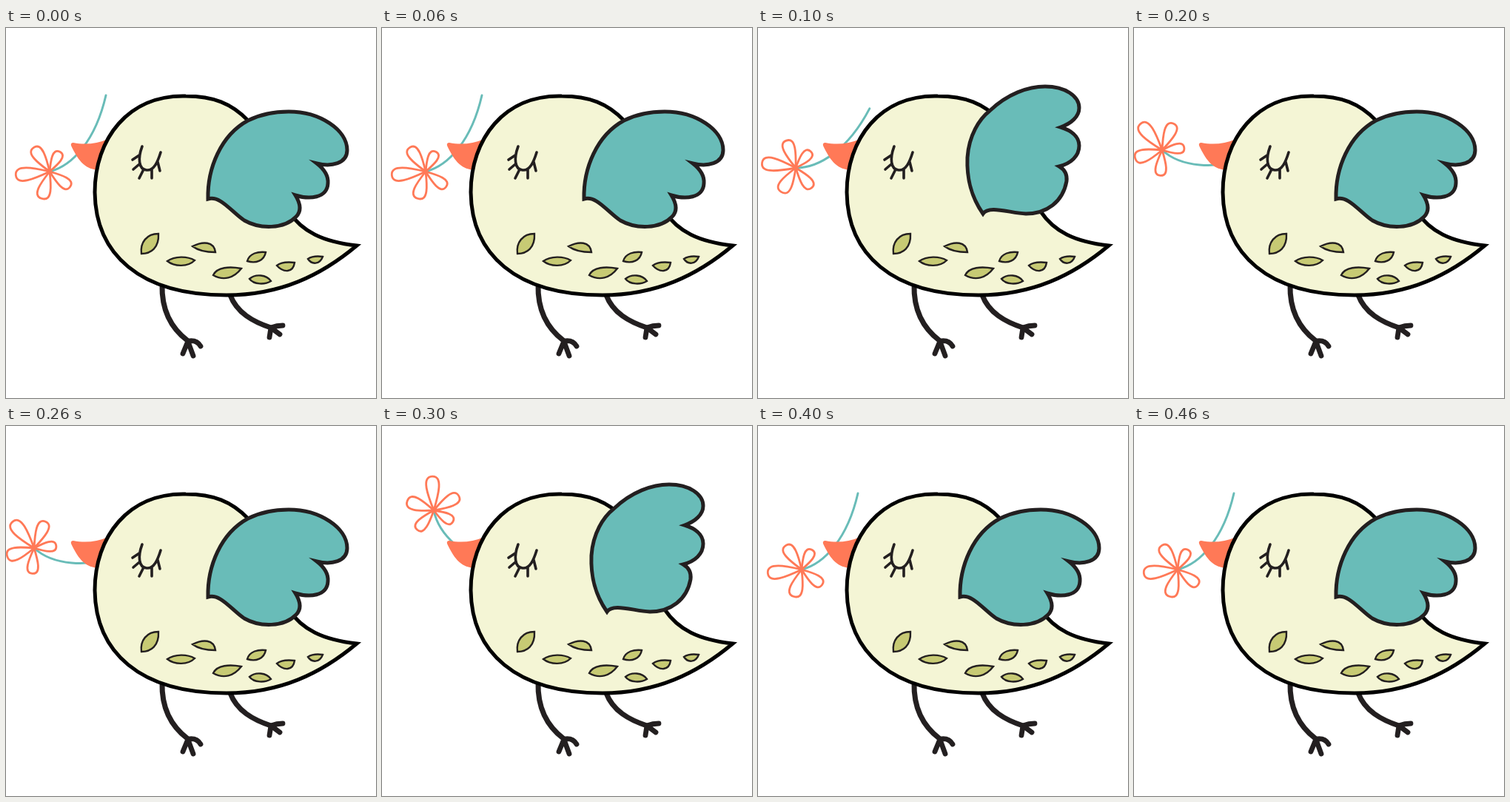
Write an HTML page with a canvas that moves like this. It is 500 px wide and 500 px high and loops after 0.5 s.

```html
<!DOCTYPE html>
<html lang="en">
<head>
<meta charset="utf-8">
<title>Bird with a flower</title>
<style>
  html, body { margin: 0; width: 100%; height: 100%; overflow: hidden; background: #fff; }
  canvas { display: block; }
</style>
</head>
<body>
<canvas id="stage" width="500" height="500"></canvas>
<script>
const ctx = document.getElementById('stage').getContext('2d');
const INK = '#231f20', CREAM = '#f4f5d5', TEAL = '#69bcb8', CORAL = '#ff7957', OLIVE = '#c7ca74';
const STEP = 100;

const body = new Path2D('M474 294C428 289 400 275 382 248C360 215 355 155 327 125C305 102 280 92 243 92C165 90 120 150 120 222C121 305 180 361 298 361C370 361 425 335 474 294Z');
const beak = new Path2D('M91 155C106 158 122 157 138 150L126 192C108 191 99 182 88 159Q87 155 91 155Z');
const stem = new Path2D('M0 0C31 -8 62 -42 76 -103');

const wings = [
  'M273 231C272 190 290 145 327 125C343 117 362 113 382 113C425 113 461 138 461 165C461 183 440 188 420 183C429 190 436 199 435 210C434 230 410 232 391 226C396 234 401 246 392 255C376 272 343 272 322 260C305 249 290 226 273 231Z',
  'M304 251C286 225 282 200 283 175C285 145 299 123 313 112C337 89 365 79 388 79C415 79 434 92 434 108C434 120 423 129 409 134C422 138 434 146 434 159C434 173 423 183 407 187C414 191 418 198 417 207C412 235 390 251 362 251C340 250 312 239 304 251Z'
].map(d => new Path2D(d));

const leaves = new Path2D([
  'M206 278C190 278 181 290 183 305C196 305 207 297 206 278Z',
  'M218 315C228 308 245 308 255 314C246 323 228 323 218 315Z',
  'M252 295C266 288 281 288 283 303C271 303 260 301 252 295Z',
  'M280 334C285 323 302 322 318 325C308 338 294 342 280 334Z',
  'M326 315C329 304 341 302 351 303C349 314 338 319 326 315Z',
  'M329 339C337 332 352 333 358 342C350 347 335 347 329 339Z',
  'M366 321C372 316 381 316 390 317C388 331 375 331 366 321Z',
  'M408 312C414 308 421 308 428 309C424 320 413 320 408 312Z'
].join(''));

const eye = new Path2D('M184 160C178 176 179 191 190 192C200 193 205 181 209 168M180 172L171 178M179 185L172 191M185 193L180 203M197 191V203M205 181L208 193');
const legs = new Path2D('M211 347C210 385 226 408 246 423M303 361C312 385 334 397 358 405');
const toes = new Path2D('M246 423L239 440M246 424L253 443M246 423Q258 421 263 430M358 405Q366 402 374 402M358 405L370 414M358 405L356 418');

// angle in degrees, length, half width
const petals = [[-123.7, 39, 9.2], [-62.6, 30, 7.8], [173.8, 46, 10.2], [106, 38, 10], [37, 34.5, 8.5]];
// flower centre and turn for each pose
const poses = [[59, 194, 0], [51, 189, 14.8], [38, 165, 57], [70, 114, 93.5], [59, 194, 0]];

const rad = deg => deg * Math.PI / 180;

function line(path, color, width, join = 'miter') {
  ctx.strokeStyle = color;
  ctx.lineWidth = width;
  ctx.lineJoin = join;
  ctx.stroke(path);
}

function shape(path, fill, color, width) {
  ctx.fillStyle = fill;
  ctx.fill(path);
  line(path, color, width);
}

function petalPath(length, half) {
  const petal = new Path2D();
  petal.moveTo(0, 0);
  petal.bezierCurveTo(length * 0.45, -half * 0.7, length, -half * 1.5, length, 0);
  petal.bezierCurveTo(length, half * 1.5, length * 0.45, half * 0.7, 0, 0);
  return petal;
}

function drawFlower([x, y, turn]) {
  ctx.save();
  ctx.translate(x, y);
  ctx.rotate(rad(turn));
  line(stem, TEAL, 3);
  for (const [angle, length, half] of petals) {
    ctx.save();
    ctx.rotate(rad(angle));
    line(petalPath(length, half), CORAL, 2.8, 'round');
    ctx.restore();
  }
  ctx.restore();
}

function draw(step) {
  ctx.fillStyle = '#fff';
  ctx.fillRect(0, 0, 500, 500);
  ctx.lineCap = 'round';
  drawFlower(poses[step]);
  ctx.fillStyle = CORAL;
  ctx.fill(beak);
  line(legs, INK, 7);
  line(toes, INK, 6.8);
  shape(body, CREAM, '#000', 5);
  shape(leaves, OLIVE, INK, 2.4);
  line(eye, INK, 3.6);
  shape(wings[step % 2], TEAL, INK, 5);
}

function tick(now) {
  draw(Math.floor(now / STEP) % poses.length);
  requestAnimationFrame(tick);
}
tick(performance.now());
</script>
</body>
</html>
```
